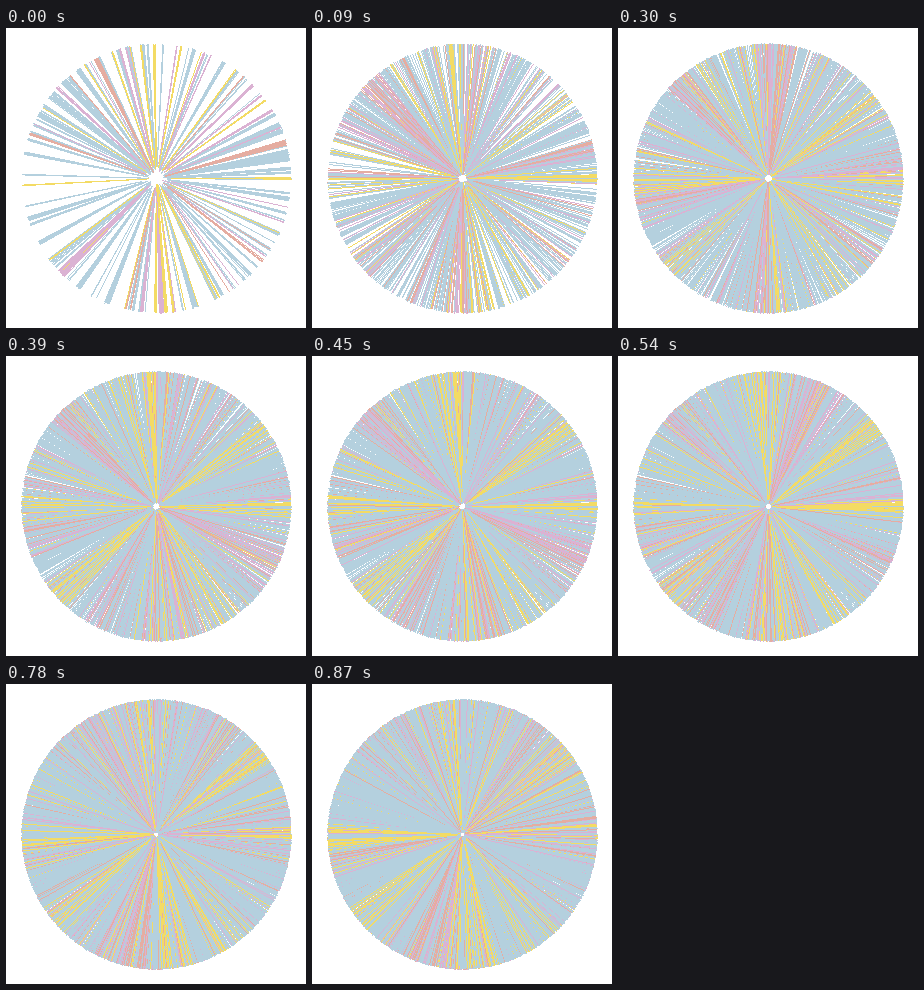
Recreate the animation shown at these times as an HTML page with a canvas. Size 300 by 300 pixels, loop 0.9 s.

```html
<!DOCTYPE html>
<html lang="en">
<head>
<meta charset="utf-8">
<title>Radial lines</title>
<style>
  html, body { margin: 0; width: 100%; height: 100%; overflow: hidden; background: #fff; }
  canvas { display: block; width: 300px; height: 300px; image-rendering: pixelated; }
</style>
</head>
<body>
<canvas id="stage" width="300" height="300"></canvas>
<script>
const SIZE = 300, MID = 150, RADIUS = 135, STEP = 30, COUNT = 30;
const BLUE = [180, 208, 222], PINK = [219, 178, 211],
      YELLOW = [243, 219, 100], SALMON = [229, 173, 161];
const ctx = document.getElementById('stage').getContext('2d');
const px = new Uint8ClampedArray(SIZE * SIZE * 4).fill(255);

let seed = 4711;
function rnd() {
  seed = (seed + 0x6D2B79F5) | 0;
  let t = Math.imul(seed ^ (seed >>> 15), 1 | seed);
  t = (t + Math.imul(t ^ (t >>> 7), 61 | t)) ^ t;
  return ((t ^ (t >>> 14)) >>> 0) / 4294967296;
}
const anyAngle = () => rnd() * 360;

// Unsmoothed ray; angles run clockwise from the right
function ray(deg, color, start) {
  const a = deg * Math.PI / 180;
  const c = Math.cos(a), s = Math.sin(a);
  const grow = 1 / Math.max(Math.abs(c), Math.abs(s));
  const end = RADIUS - rnd() * 0.9;
  for (let r = start; r <= end; r += grow) {
    const x = Math.round(MID + c * r), y = Math.round(MID + s * r);
    const p = (y * SIZE + x) * 4;
    for (let k = 0; k < 3; k++) px[p + k] = color[k];
  }
}

function wedge(color, deg, width) {
  const start = 6 + rnd() * 8;
  for (let d = -width / 2; d <= width / 2; d += 0.28) {
    ray(deg + d, color, start + rnd() * 4);
  }
}

function scatter(color, count, maxWidth) {
  for (let i = 0; i < count; i++) {
    wedge(color, anyAngle(), 0.2 + maxWidth * rnd() * rnd());
  }
}

function open() {
  scatter(BLUE, 125, 2.6);
  scatter(PINK, 22, 2);
  scatter(SALMON, 12, 2);
  scatter(YELLOW, 22, 1);
  wedge(PINK, 135, 4);
  wedge(PINK, 88, 2.2);
  wedge(SALMON, -15.5, 2.4);
  wedge(YELLOW, 86, 1.4);
  wedge(YELLOW, -91, 0.9);
}

// Yellow gathers in lasting fans, the warm tones in short-lived ones
const yellowFans = [[-98, 16], [84, 12], [178, 8], [0, 5], [-38, 8], [140, 10], [58, 10]];
let warmFans = [];

function yellowAngle() {
  const [deg, width] = yellowFans[Math.floor(rnd() * yellowFans.length)];
  return deg + (rnd() + rnd() - 1) * width;
}

function warmAngle() {
  const deg = warmFans[Math.floor(rnd() * warmFans.length)];
  return deg + (rnd() + rnd() - 1) * 9;
}

function advance(n) {
  const start = () => 4.2 - n * 0.07 + rnd() * 9;
  if (n % 5 === 1) warmFans = Array.from({ length: 9 }, anyAngle);
  for (let i = 0; i < 130; i++) ray(anyAngle(), BLUE, start());
  const accents = 66 - n * 0.5;
  for (let i = 0; i < accents; i++) {
    const tone = rnd(), loose = rnd() < 0.35;
    if (tone < 0.37) ray(loose ? anyAngle() : yellowAngle(), YELLOW, start());
    else ray(loose ? anyAngle() : warmAngle(), tone < 0.72 ? PINK : SALMON, start());
  }
}

const frames = [];
for (let n = 0; n < COUNT; n++) {
  if (n) advance(n); else open();
  frames.push(new ImageData(px.slice(), SIZE, SIZE));
}

let shown = -1;
function show(time) {
  const n = Math.floor(time / STEP) % COUNT;
  if (n !== shown) ctx.putImageData(frames[shown = n], 0, 0);
}

show(0);
let origin;
requestAnimationFrame(function tick(now) {
  if (origin === undefined) origin = now;
  show(now - origin);
  requestAnimationFrame(tick);
});
</script>
</body>
</html>
```
